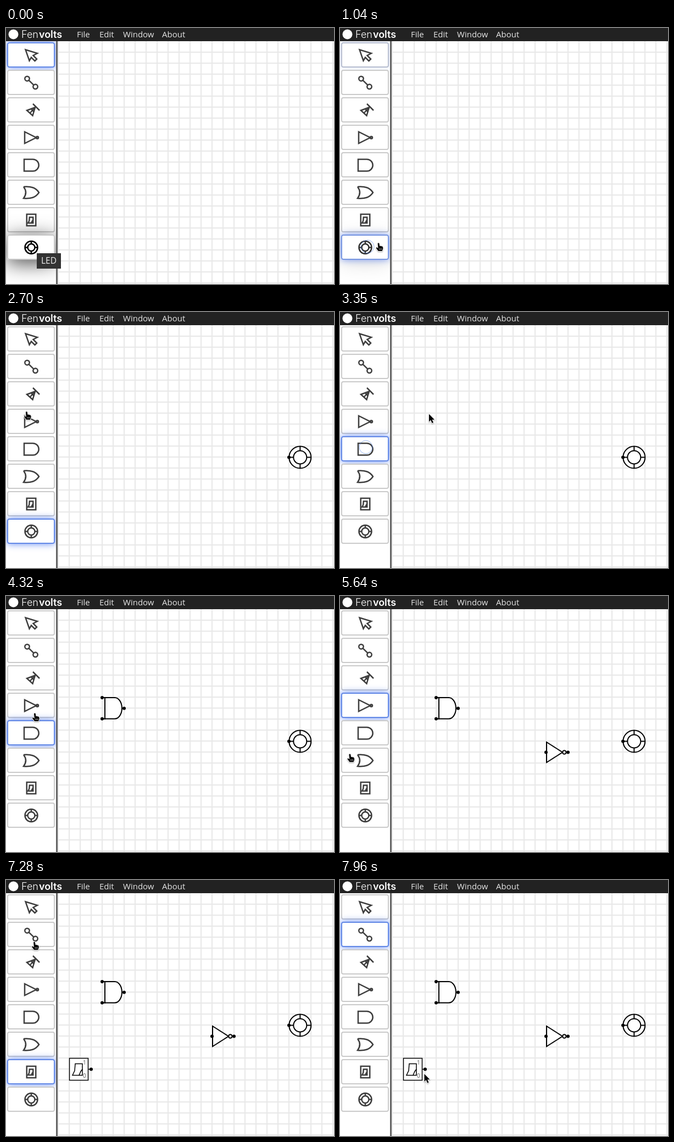
Animation of 597 by 466 pixels, one loop 8 s. Source, as an HTML page with a canvas:

```html
<!DOCTYPE html>
<html lang="en">
<head>
<meta charset="utf-8">
<title>Logic editor</title>
<style>
html, body { margin: 0; width: 100%; height: 100%; overflow: hidden; background: #fff; }
canvas { display: block; width: 597px; height: 466px; }
</style>
</head>
<body>
<canvas id="stage"></canvas>
<script>
const W = 597, H = 466, LOOP = 8000, GRID = 20;
const BAR = 24, SIDE = 91;
const canvas = document.getElementById('stage');
const dpr = window.devicePixelRatio || 1;
canvas.width = W * dpr;
canvas.height = H * dpr;
const c = canvas.getContext('2d');
const TAU = Math.PI * 2;
const UI_FONT = '"Open Sans", "Noto Sans", sans-serif';
const clamp = v => Math.max(0, Math.min(1, v));

// Each step either picks a tool, drops a part, or is only passed by.
const steps = [
  { at: 880, x: 50, y: 398, tool: 7 },
  { at: 1580, x: 505, y: 225, part: drawLed },
  { at: 1940, x: 289, y: 274 },
  { at: 2500, x: 50, y: 118 },
  { at: 3000, x: 47, y: 246, tool: 4 },
  { at: 3480, x: 165, y: 184, part: drawAnd },
  { at: 4420, x: 51, y: 213, tool: 3 },
  { at: 5240, x: 366, y: 252, part: drawNot },
  { at: 5640, x: 17, y: 287 },
  { at: 6080, x: 46, y: 348, tool: 6 },
  { at: 6720, x: 108, y: 310, part: drawSwitch },
  { at: 7460, x: 46, y: 98, tool: 1 },
  { at: 7960, x: 153, y: 353 }
];
const picks = [{ at: -999, tool: 0 }, ...steps.filter(s => 'tool' in s)];
const drops = steps.filter(s => s.part);
const clicks = steps.filter(s => 'tool' in s || s.part);

// The pointer rests around every click and passes the other steps in motion.
const LEAD = 100, MAX_TRIP = 500;
const path = steps.flatMap((s, i) => {
  const point = (t, v) => ({ t, x: s.x, y: s.y, rest: v });
  if (!clicks.includes(s)) return [point(s.at, i === steps.length - 1)];
  const leave = Math.max(s.at + LEAD, steps[i + 1].at - LEAD - MAX_TRIP);
  return [point(s.at - LEAD, true), point(leave, true)];
});

function slope(i, axis) {
  if (path[i].rest) return 0;
  const a = path[i - 1], b = path[i + 1];
  return (b[axis] - a[axis]) / (b.t - a.t);
}

function pointerAt(t) {
  t = Math.max(path[0].t, Math.min(path.at(-1).t - 0.01, t));
  const i = path.findLastIndex(p => p.t <= t);
  const a = path[i], b = path[i + 1], d = b.t - a.t, u = (t - a.t) / d;
  const hermite = axis =>
    a[axis] + (b[axis] - a[axis]) * u * u * (3 - 2 * u) +
    d * u * (1 - u) * (slope(i, axis) * (1 - u) - slope(i + 1, axis) * u);
  return { x: hermite('x'), y: hermite('y') };
}

function buttonUnder({ x, y }) {
  const row = Math.floor((y - 26) / 50);
  return x > 2 && x < 89 && row >= 0 && row < 8 && (y - 26) % 50 < 46 ? row : -1;
}

// Share of the recent past spent over a button, slow to build up.
function hoverAmount(i, t) {
  let n = 0;
  for (let k = 0; k < 20; k++) if (buttonUnder(pointerAt(t - k * 20)) === i) n++;
  return (n / 20) ** 4;
}

function pickAmount(i, t) {
  const k = picks.findLastIndex(p => p.at <= t);
  const u = clamp((t - picks[k].at) / 200);
  if (picks[k].tool === i) return u;
  return k > 0 && picks[k - 1].tool === i ? 1 - u : 0;
}

function pen(color, width) {
  c.strokeStyle = color;
  c.lineWidth = width;
}
function line(points, close) {
  c.beginPath();
  for (let i = 0; i < points.length; i += 2) c.lineTo(points[i], points[i + 1]);
  if (close) c.closePath();
  c.stroke();
}
function inked() {
  c.fillStyle = '#fff';
  c.fill();
  c.stroke();
}
function ring(x, y, r) {
  c.beginPath();
  c.arc(x, y, r, 0, TAU);
  c.stroke();
}
function dot(x, y, r = 3, color = '#000') {
  c.beginPath();
  c.arc(x, y, r, 0, TAU);
  c.fillStyle = color;
  c.fill();
}
function text(str, x, y, font, color) {
  c.font = font;
  c.fillStyle = color;
  c.fillText(str, x, y);
}

// Symbols shared by the tool icons and the parts on the grid.
function wheel(x, y, r, inner) {
  c.beginPath();
  c.arc(x, y, r, 0, TAU);
  inked();
  ring(x, y, inner);
  for (let a = 0; a < TAU; a += TAU / 4) {
    const dx = Math.cos(a), dy = Math.sin(a);
    line([x + dx * inner, y + dy * inner, x + dx * r, y + dy * r]);
  }
}
function bullet(x, y, w, h, round) {
  c.beginPath();
  c.moveTo(x, y);
  c.ellipse(x + w - round, y + h / 2, round, h / 2, 0, -TAU / 4, TAU / 4);
  c.lineTo(x, y + h);
  c.closePath();
  inked();
}
function inverter(x, y, w, h, bubble) {
  c.beginPath();
  c.moveTo(x, y - h / 2);
  c.lineTo(x, y + h / 2);
  c.lineTo(x + w, y);
  c.closePath();
  inked();
  ring(x + w + bubble, y, bubble);
}
function rocker(x, y, w, h, s) {
  c.beginPath();
  c.rect(x - w / 2, y - h / 2, w, h);
  inked();
  const at = pts => pts.map((v, i) => (i % 2 ? y : x) + v * s);
  line(at([-6.5, -10, 6.5, -10, 6.5, 11, -11.5, 11, -7.5, 2.5]), true);
  line(at([6.5, 0, 3.5, 4, 0.5, 11]));
}

function drawLed() {
  wheel(535.3, 264.5, 20, 12);
  dot(515, 264.5);
}
function drawAnd() {
  bullet(180, 185, 31, 38.5, 13);
  for (const y of [185, 223.5]) {
    line([175, y, 181, y]);
    dot(175, y);
  }
  dot(215, 204.5);
}
function drawNot() {
  inverter(376, 284.5, 29, 37, 3.3);
  dot(375, 284.5);
  dot(415, 284.5);
}
function drawSwitch() {
  pen('#000', 1.5);
  rocker(132.5, 344.5, 34, 40, 1);
  text('1', 140, 335.5, '10px ' + UI_FONT, '#555');
  text('0', 140, 360, '10px ' + UI_FONT, '#555');
  line([150, 344.5, 155, 344.5]);
  dot(155, 344.5);
}

// Tool icons, centred on 0,0.
const icons = [
  () => line([-10.5, -10, 11, -3.5, 3.5, 0.5, 10, 7, 6.5, 10.5, 0, 4, -3.5, 10], true),
  () => {
    for (const s of [-1, 1]) ring(7.5 * s, 7.3 * s, 4.2);
    line([-4.5, -4.3, 4.5, 4.3]);
  },
  () => {
    line([3, -11.5, 15, 0.5]);
    line([7, -5, -8, 0.5, 2.5, 10], true);
    line([7, -5, -2.5, 5.5]);
    line([0, -2, 4.5, 3]);
  },
  () => inverter(-12, 0, 21, 21, 2),
  () => bullet(-13, -10.5, 26.7, 21.5, 10.7),
  () => {
    c.beginPath();
    c.moveTo(-14, -10.5);
    c.bezierCurveTo(0, -11.5, 8, -9, 14, 0);
    c.bezierCurveTo(8, 9, 0, 11.5, -14, 10.5);
    c.quadraticCurveTo(-6, 0, -14, -10.5);
    c.stroke();
  },
  () => rocker(0, 0, 16.5, 21, 0.5),
  () => wheel(0, 0, 11.5, 6.5)
];

function buttonShape(i, inset = 0) {
  c.beginPath();
  c.roundRect(2 + inset, 26 + 50 * i + inset, 87 - 2 * inset, 46 - 2 * inset, 4 - inset);
}

function castShadow(i, color, blur, dy) {
  c.save();
  c.shadowColor = color;
  c.shadowBlur = blur * dpr;
  c.shadowOffsetY = dy * dpr;
  c.fillStyle = '#fff';
  buttonShape(i);
  c.fill();
  c.restore();
}

function drawButton(i, t) {
  const on = pickAmount(i, t);
  const hover = hoverAmount(i, t) * (1 - on);
  if (hover > 0.004) castShadow(i, `rgba(0,0,0,${0.72 * hover})`, 36, 6);
  if (on > 0) castShadow(i, `rgba(70,115,240,${0.85 * on})`, 13, 0);
  buttonShape(i);
  c.fillStyle = '#fff';
  c.fill();
  const mix = (a, b) => Math.round(a + (b - a) * on);
  pen(`rgb(${mix(202, 98)},${mix(202, 136)},${mix(202, 230)})`, 2);
  buttonShape(i, 1);
  c.stroke();
  const shade = Math.round(62 * (1 - hover));
  pen(`rgb(${shade},${shade},${shade})`, 2.5);
  c.save();
  c.translate(46, 49.5 + 50 * i);
  icons[i]();
  c.restore();
}

function drawGrid() {
  c.fillStyle = '#e8e8e8';
  for (let x = 94; x < W; x += GRID) c.fillRect(x, BAR, 2, H);
  for (let y = 43; y < H; y += GRID) c.fillRect(94, y, W, 2);
}

function drawHeader() {
  c.fillStyle = '#222';
  c.fillRect(0, 0, W, BAR);
  dot(13.5, 11.5, 9, '#fff');
  text('Fen', 28, 18, '300 18px Inter, sans-serif', '#fff');
  const end = 29 + c.measureText('Fen').width;
  text('volts', end, 18, '600 18px Inter, sans-serif', '#fff');
  const menu = { File: 129, Edit: 170, Window: 213, About: 284 };
  for (const name in menu) text(name, menu[name], 17, '15px ' + UI_FONT, '#e4e4e4');
}

function drawSidebar(t) {
  c.save();
  c.beginPath();
  c.rect(0, BAR, SIDE, H);
  c.clip();
  c.fillStyle = '#fff';
  c.fillRect(0, BAR, SIDE, H);
  for (let i = 0; i < icons.length; i++) drawButton(i, t);
  c.restore();
  c.fillStyle = '#666';
  c.fillRect(SIDE, BAR, 3, H);
}

function drawTooltip() {
  c.fillStyle = '#333';
  c.fillRect(56, 410, 44, 28);
  text('LED', 64, 429, '15.5px ' + UI_FONT, '#eee');
}

function drawRipples(t) {
  for (const { at, x, y } of clicks) {
    const age = t - at;
    if (age < 0 || age >= 380) continue;
    pen('rgba(85,135,240,0.6)', 1);
    ring(x, y, 4 + 8 * clamp(age / 140));
  }
}

const ARROW = new Path2D('M0 0V14L3.2 11L5.6 16.5L8 15.5L5.6 10.2H10Z');
const HAND = new Path2D('M-.5 1Q1 -.5 2.2 1L3 6L5 5.5L6 6.5L7.5 6.2L8.5 7.5Q9.5 8 9 11' +
  'L7.5 15H.5L-3.5 9.5Q-3 7.5 -1 9L.3 10Z');

function drawPointer(t) {
  const pos = pointerAt(t);
  const hand = buttonUnder(pos) >= 0;
  const shape = hand ? HAND : ARROW;
  c.save();
  c.translate(pos.x + 0.5, pos.y);
  c.lineJoin = 'round';
  c.shadowColor = 'rgba(0,0,0,0.35)';
  c.shadowBlur = 2 * dpr;
  c.shadowOffsetY = dpr;
  pen('#fff', 2);
  c.stroke(shape);
  c.shadowColor = 'transparent';
  c.fillStyle = '#000';
  c.fill(shape);
  if (hand) {
    pen('#fff', 0.6);
    for (let x = 2.5; x < 7; x += 2) line([x, 10, x, 13]);
  }
  c.restore();
}

function render(t) {
  c.setTransform(dpr, 0, 0, dpr, 0, 0);
  c.fillStyle = '#fff';
  c.fillRect(0, 0, W, H);
  drawGrid();
  for (const { at, part } of drops) {
    if (t < at) continue;
    pen('#000', 2);
    part();
  }
  drawSidebar(t);
  drawHeader();
  const moving = t >= steps[0].at;
  if (!moving) drawTooltip();
  drawRipples(t);
  if (moving) drawPointer(t);
}

const start = performance.now();
function frame() {
  render((performance.now() - start) % LOOP);
  requestAnimationFrame(frame);
}
frame();
</script>
</body>
</html>
```
